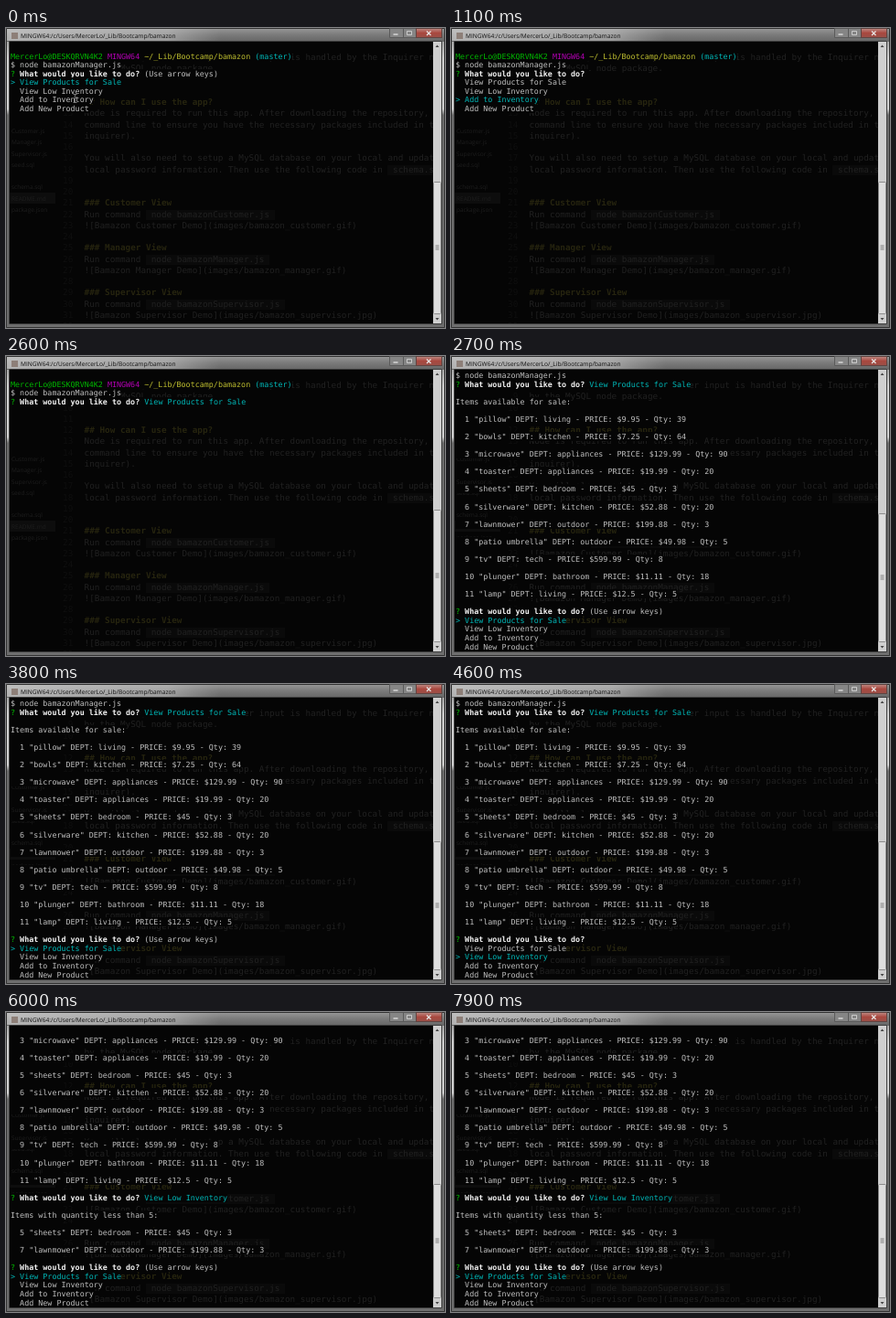
Recreate the animation shown at these times as an HTML page. Size 480 px wide and 328 px high, loop 8000 ms.

```html
<!DOCTYPE html>
<html lang="en">
<head>
<meta charset="utf-8">
<title>Terminal session</title>
<style>
html, body { margin: 0; width: 480px; height: 328px; overflow: hidden; background: #000; }
body { position: relative; }
svg, pre, #glass { position: absolute; }
svg { left: 0; top: 0; }
pre { margin: 0; text-rendering: geometricPrecision; }
#glass { left: 4px; top: 15px; width: 463px; height: 308px; overflow: hidden; background: #050505; }
#glass pre { font: 9.35px/12.25px "DejaVu Sans Mono", monospace; color: #212121; }
#glass .head { color: #26240f; font-weight: bold; }
#glass .num { color: #0f0f0f; }
#glass .file { font: 6.5px/12.25px "Open Sans", sans-serif; color: #1e1e1e; }
#glass code { font: inherit; background: #0a0a0a; }
#tree { position: absolute; left: 0; top: 165px; width: 50px; height: 12px; background: #0d0d0d; }
#term { left: 5px; top: 17.1px; font: 8.4px/9.57px "DejaVu Sans Mono", monospace; color: #c0c0c0; }
.row { background: #050505; }
.g { color: #00b800; }
.m { color: #b400b4; }
.y { color: #bfbf30; }
.c { color: #00b8b8; }
.q { color: #f4f4f4; font-weight: bold; }
</style>
</head>
<body>
<div id="glass"><div id="tree"></div></div>
<pre id="term"></pre>
<svg width="480" height="328" viewBox="0 0 480 328">
  <defs>
    <linearGradient id="bar" x2="0" y2="1">
      <stop offset="0" stop-color="#999"/><stop offset=".5" stop-color="#7a7a7a"/><stop offset="1" stop-color="#666"/>
    </linearGradient>
    <linearGradient id="frame" x2="0" y2="1">
      <stop offset="0" stop-color="#888"/><stop offset=".1" stop-color="#d4d4d4"/><stop offset=".27" stop-color="#d4d4d4"/><stop offset=".29" stop-color="#6e6e6e"/>
    </linearGradient>
    <linearGradient id="glow">
      <stop offset="0" stop-color="#d2d2d2" stop-opacity=".7"/><stop offset=".75" stop-color="#c4c4c4" stop-opacity=".55"/><stop offset="1" stop-color="#bbb" stop-opacity="0"/>
    </linearGradient>
    <linearGradient id="close" x2="0" y2="1">
      <stop offset="0" stop-color="#c08a84"/><stop offset=".5" stop-color="#a8483f"/><stop offset="1" stop-color="#9a4f48"/>
    </linearGradient>
  </defs>
  <path d="M0 0H480V328H0ZM4 15V323H476V15Z" fill="url(#frame)" fill-rule="evenodd"/>
  <rect width="480" height="15" fill="url(#bar)"/>
  <rect y="1" width="235" height="13" fill="url(#glow)"/>
  <path d="M.5 .5H479.5V327.5H.5Z" fill="none" stroke="#333"/>
  <path d="M3.5 14.5H476.5V323.5H3.5Z" fill="none" stroke="#3c3c3c"/>
  <rect x="6" y="5" width="7" height="7" fill="#8d7f78"/>
  <text x="16" y="10.8" font-family="Open Sans, sans-serif" font-size="6.6" text-rendering="geometricPrecision" fill="#111">MINGW64:/c/Users/MercerLo/_Lib/Bootcamp/bamazon</text>
  <path d="M419.5 .5H476.5V10.5H419.5ZM434.5 .5V10.5" fill="#858585" stroke="#5a5a5a"/>
  <rect x="448.5" y=".5" width="28" height="10" fill="url(#close)" stroke="#5f4441"/>
  <path d="M423.500 7H428.500" stroke="#ddd" stroke-width="1.4"/>
  <path d="M438.500 3.500H443.500V7.500H438.500Z" fill="none" stroke="#ccc"/>
  <path d="M460 3.500L464.500 8M464.500 3.500L460 8" stroke="#e8e8e8" stroke-width="1.2"/>
  <rect x="467" y="15" width="9" height="308" fill="#cfcfcf"/>
  <path d="M469.5 21L471.5 18.5L473.5 21ZM469.5 317L471.5 319.5L473.5 317Z" fill="#444"/>
  <rect id="thumb" x="467.5" width="8" rx="1" fill="#dedede" stroke="#8c8c8c"/>
  <path id="grip" d="M469.5 -2H473.5M469.5 0H473.5M469.5 2H473.5" stroke="#666" stroke-width=".8"/>
  <path id="mouse" d="M73.5 72.5H77.500M75.5 73V81M73.5 81.5H77.500" fill="none" stroke="#aaa" stroke-width=".7"/>
</svg>
<script>
const LOOP = 8000;
const $ = id => document.getElementById(id);
const tint = (cls, text) => `<span class="${cls}">${text}</span>`;

// Dim editor behind the translucent terminal
const glass = $("glass");
function ghost(x, y, text, cls = "") {
  const el = document.createElement("pre");
  el.className = cls;
  el.style.left = x - 4 + "px";
  el.style.top = y - 21 + "px";
  el.innerHTML = text.replace(/`(.*?)(`|$)/g, "<code> $1 </code>");
  glass.append(el);
}
const view = (name, ext) => [
  `### ${name} View`,
  `Run command \`node bamazon${name}.js\``,
  `![Bamazon ${name} Demo](images/bamazon_${name.toLowerCase()}.${ext})`,
  ""
];
const readme = [
  "* [Inquirer] For user input. User input is handled by the Inquirer node",
  "by the MySQL node package.", "", "",
  "## How can I use the app?",
  "Node is required to run this app. After downloading the repository, run",
  "command line to ensure you have the necessary packages included in the",
  "inquirer).", "",
  "You will also need to setup a MySQL database on your local and update",
  "local password information. Then use the following code in `schema.sql", "", "",
  ...view("Customer", "gif"), ...view("Manager", "gif"), ...view("Supervisor", "jpg")
];
readme.forEach((line, i) => {
  const y = 33.2 + i * 12.25;
  ghost(62, y, String(i + 8).padStart(2), "num");
  ghost(85.5, y, line, line.startsWith("##") ? "head" : "");
});
["Customer.js", "Manager.js", "Supervisor.js", "seed.sql", "", "schema.sql", "README.md", "package.json"]
  .forEach((name, i) => ghost(6, 113 + i * 12.25, name, "file"));

// Terminal text
const choices = ["View Products for Sale", "View Low Inventory", "Add to Inventory", "Add New Product"];
const items = [
  ["pillow", "living", 9.95, 39], ["bowls", "kitchen", 7.25, 64],
  ["microwave", "appliances", 129.99, 90], ["toaster", "appliances", 19.99, 20],
  ["sheets", "bedroom", 45, 3], ["silverware", "kitchen", 52.88, 20],
  ["lawnmower", "outdoor", 199.88, 3], ["patio umbrella", "outdoor", 49.98, 5],
  ["tv", "tech", 599.99, 8], ["plunger", "bathroom", 11.11, 18], ["lamp", "living", 12.5, 5]
].map(([name, dept, price, qty], i) => ({
  qty, text: `  ${i + 1} "${name}" DEPT: ${dept} - PRICE: $${price} - Qty: ${qty}`
}));
const ask = tail => `${tint("g", "?")} ${tint("q", "What would you like to do?")} ${tail}`;
const menu = (pick, hint) => [
  ask(hint ? "(Use arrow keys)" : ""),
  ...choices.map((c, i) => i === pick ? tint("c", "&gt; " + c) : "  " + c)
];
const answer = pick => ask(tint("c", choices[pick]));
const listing = (title, list) => ["", title, "", ...list.flatMap(item => [item.text, ""])];

const start = [
  "",
  [tint("g", "MercerLo@DESKQRVN4K2"), tint("m", "MINGW64"), tint("y", "~/_Lib/Bootcamp/bamazon"), tint("c", "(master)")].join(" "),
  "$ node bamazonManager.js"
];
const all = [...start, answer(0), ...listing("Items available for sale:", items)];
const low = [...all, answer(1), ...listing("Items with quantity less than 5:", items.filter(i => i.qty < 5))];

// time, printed lines, highlighted choice (-1: no menu), key hint, scrollbar thumb top
const steps = [
  [0, start, 0, true, 168],
  [700, start, 1, false, 168],
  [1100, start, 2, false, 168],
  [1200, start, 3, false, 168],
  [1600, start, 2, false, 168],
  [1800, start, 1, false, 168],
  [2100, start, 0, false, 168],
  [2600, [...start, answer(0)], -1, false, 168],
  [2700, all, 0, true, 172],
  [4500, all, 1, false, 172],
  [5500, low, 0, true, 188]
];

let shown;
function draw(now) {
  const t = now % LOOP;
  const step = steps.findLast(s => s[0] <= t);
  if (step !== shown) {
    shown = step;
    const [time, lines, pick, hint, top] = step;
    const screen = pick < 0 ? lines : [...lines, ...menu(pick, hint)];
    $("term").innerHTML = screen.slice(-32).map(line => tint("row", line)).join("\n");
    $("thumb").setAttribute("y", top + 0.5);
    $("thumb").setAttribute("height", 312 - top);
    $("grip").setAttribute("transform", `translate(0 ${(top + 312) / 2})`);
    $("mouse").style.display = time ? "none" : "";
  }
  requestAnimationFrame(() => draw(performance.now()));
}
draw(performance.now());
</script>
</body>
</html>
```
